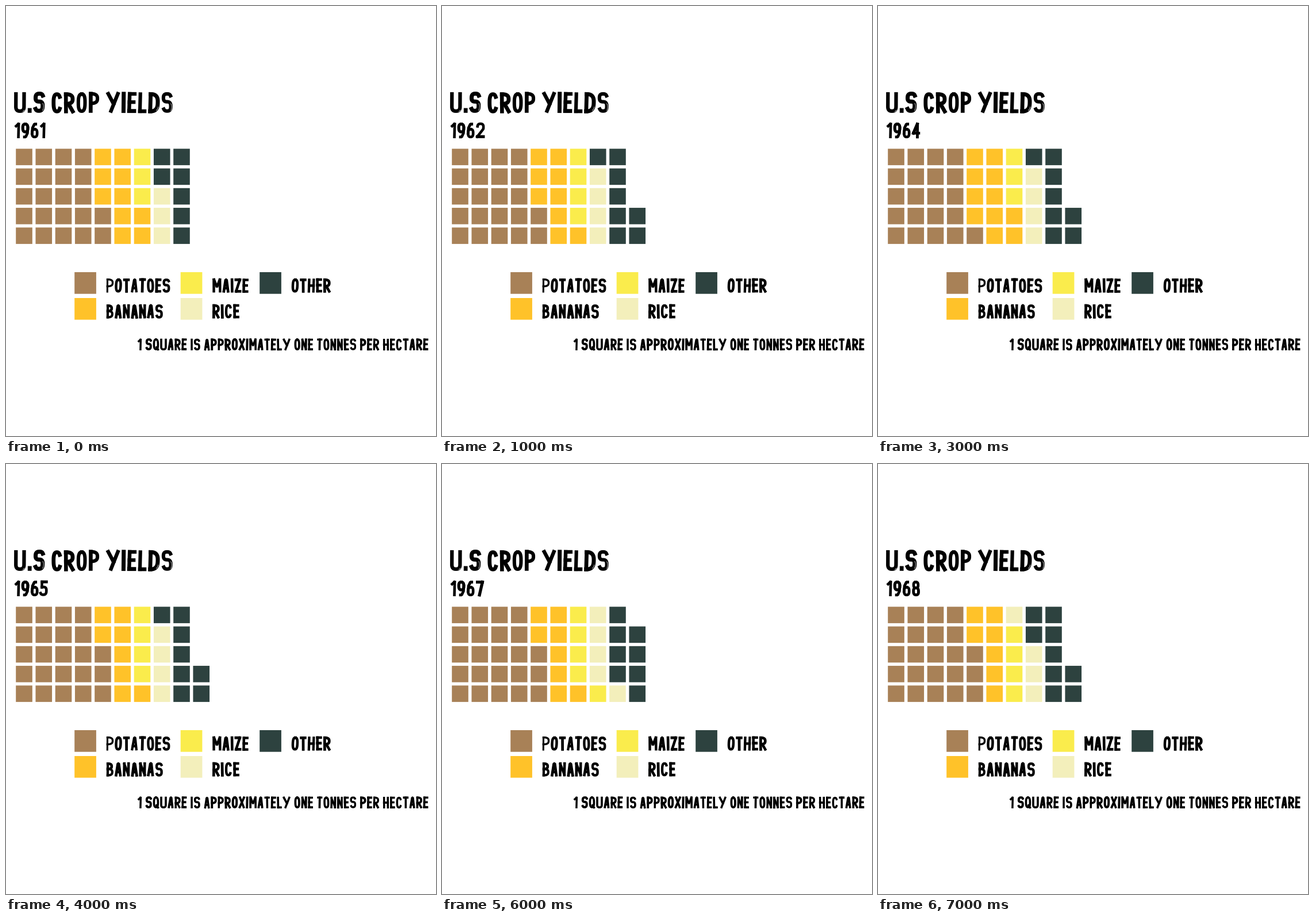
Animation of 748x748 px, one loop 8000 ms. Source, as a matplotlib script:

```python
import random

import numpy as np
import matplotlib.pyplot as plt
from matplotlib.animation import FuncAnimation
from matplotlib.patches import PathPatch, Rectangle
from matplotlib.path import Path

SIZE, DPI = 748, 100
PX = 72 / DPI
INK = "black"
CROPS = {
    "POTATOES": "#a88157",
    "BANANAS": "#ffc229",
    "MAIZE": "#faec4c",
    "RICE": "#f3efbb",
    "OTHER": "#2d423f",
}
# squares per crop, in the order above, one row per year from 1961
YIELDS = [
    (22, 10, 3, 3, 7),
    (22, 9, 4, 4, 8),
    (22, 9, 4, 4, 8),
    (21, 11, 3, 4, 8),
    (23, 8, 4, 4, 8),
    (23, 9, 4, 4, 8),
    (23, 8, 5, 5, 8),
    (23, 7, 4, 4, 9),
]
ROWS, COLS = 5, 10
CELL, STEP = 28.6, 34.25
GRID_X, GRID_Y = 17.2, 248.3


# Hand-lettered caps: strokes inside a unit box, y pointing up.
def line(*points):
    return np.array(points, float)


def arc(cx, cy, rx, ry, start, end):
    """Part of a slightly boxy ellipse, angles in degrees."""
    a = np.radians(np.linspace(start, end, 33))
    c, s = np.cos(a), np.sin(a)
    boxy = lambda v: np.sign(v) * np.abs(v) ** 0.75
    return np.column_stack((cx + rx * boxy(c), cy + ry * boxy(s)))


def join(*parts):
    return np.vstack(parts)


def bar(y, x0=0, x1=1):
    return line((x0, y), (x1, y))


def stem(x=0, y0=0, y1=1):
    return line((x, y0), (x, y1))


def lobe(cy, rx, ry):
    return arc(0, cy, rx, ry, 90, -90)


RING = arc(0.5, 0.5, 0.5, 0.5, 90, 450)
P_LOBE = lobe(0.72, 1, 0.28)

# glyph: (width relative to cap height, strokes)
GLYPHS = {
    "A": (0.48, [line((0, 0), (0.4, 1), (0.62, 1), (1, 0)), bar(0.27, 0.2, 0.8)]),
    "B": (0.5, [stem(), lobe(0.77, 0.85, 0.23), lobe(0.27, 1, 0.27)]),
    "C": (0.5, [arc(0.5, 0.5, 0.5, 0.5, 38, 322)]),
    "D": (0.53, [stem(), lobe(0.5, 1, 0.5)]),
    "E": (0.42, [stem(), bar(1), bar(0.52, 0, 0.85), bar(0)]),
    "H": (0.5, [stem(), stem(1), bar(0.5)]),
    "I": (0.19, [stem(0.5)]),
    "L": (0.4, [stem(), bar(0)]),
    "M": (0.62, [stem(), stem(1), line((0.05, 1), (0.5, 0.35), (0.95, 1))]),
    "N": (0.48, [stem(), stem(1), line((0, 0.95), (1, 0.05))]),
    "O": (0.5, [RING]),
    "P": (0.5, [stem(), P_LOBE]),
    "Q": (0.52, [RING, line((0.65, 0.2), (1, -0.03))]),
    "R": (0.5, [stem(), P_LOBE, line((0.4, 0.42), (1, 0))]),
    "S": (0.53, [join(arc(0.5, 0.77, 0.5, 0.23, 25, 270),
                      arc(0.5, 0.27, 0.5, 0.27, 90, -150))]),
    "T": (0.46, [bar(1), stem(0.5)]),
    "U": (0.57, [join(line((0, 1)), arc(0.5, 0.28, 0.5, 0.28, 180, 360),
                      line((1, 1)))]),
    "X": (0.52, [line((0, 0), (1, 1)), line((0, 1), (1, 0))]),
    "Y": (0.64, [line((1, 1), (0.3, 0)), line((0, 1), (0.55, 0.42))]),
    "Z": (0.46, [bar(1), line((1, 1), (0, 0)), bar(0)]),
    ".": (0.18, [stem(0.5, 0, 0.05)]),
    "1": (0.34, [line((0, 0.84), (0.8, 1)), stem(1)]),
    "2": (0.56, [join(arc(0.5, 0.73, 0.5, 0.27, 170, -25), line((0, 0))), bar(0)]),
    "3": (0.5, [arc(0.45, 0.77, 0.5, 0.23, 150, -90),
                arc(0.45, 0.27, 0.55, 0.27, 90, -150)]),
    "4": (0.52, [stem(0.75), line((0.7, 1), (0, 0.3)), bar(0.3)]),
    "5": (0.5, [bar(1, 0.1, 0.95), stem(0.08, 0.58, 1),
                join(line((0.08, 0.58)), arc(0.4, 0.3, 0.6, 0.3, 90, -150))]),
    "6": (0.5, [arc(0.5, 0.3, 0.5, 0.3, 90, 450),
                line((0, 0.3), (0.08, 0.7), (0.45, 1), (0.7, 1))]),
    "7": (0.5, [bar(1), line((1, 1), (0.4, 0))]),
    "8": (0.5, [arc(0.5, 0.77, 0.45, 0.23, 90, 450),
                arc(0.5, 0.27, 0.5, 0.27, 90, 450)]),
    "9": (0.5, [arc(0.5, 0.7, 0.5, 0.3, 90, 450),
                line((1, 0.7), (0.92, 0.3), (0.55, 0), (0.3, 0))]),
}
GAP, SPACE = 0.095, 0.15

fig = plt.figure(figsize=(SIZE / DPI, SIZE / DPI), dpi=DPI, facecolor="white")
ax = fig.add_axes([0, 0, 1, 1])
ax.set(xlim=(0, SIZE), ylim=(SIZE, 0))
ax.axis("off")


def stroke(points, width, color=INK):
    return ax.add_patch(PathPatch(
        Path(points), facecolor="none", edgecolor=color, lw=width * PX,
        capstyle="projecting", joinstyle="bevel", snap=False))


def write(text, x, base, height, weight=0.178, worn=False):
    """Letter the text from x on its baseline; return artists and next x."""
    artists = []
    for i, ch in enumerate(text):
        if ch == " ":
            x += (SPACE + GAP) * height
            continue
        rng = random.Random(f"{ch}{i}")
        width, strokes = GLYPHS[ch]
        t = weight * height
        w = width * height
        lean = rng.uniform(-0.02, 0.03) * height
        lift = rng.uniform(-0.015, 0.015) * height
        for s in strokes:
            px = x + t / 2 + s[:, 0] * max(w - t, 0) + lean * (s[:, 1] - 0.5)
            py = base - t / 2 - s[:, 1] * (height - t) + lift
            points = np.column_stack((px, py))
            artists.append(stroke(points, t * rng.uniform(0.93, 1.1)))
            if worn and ch in "USD" and len(s) > 30:
                n = len(s)
                scratch = points[int(n * 0.6):int(n * 0.8)] + (0.22 * t, 0.2 * t)
                artists.append(stroke(scratch, 0.7, "white"))
        x += w + GAP * height
    return artists, x


def square(x, y, size, color):
    return ax.add_patch(Rectangle((x, y), size, size, fc=color, lw=0, snap=False))


write("U.S CROP YIELDS", 14, 186, 36.2, worn=True)
_, digit_x = write("196", 15, 230, 27.2)
digits = [write(str(n + 1), digit_x, 230, 27.2)[0] for n in range(len(YIELDS))]

# legend: (swatch x, swatch y) for each crop
SPOTS = [(119.2, 463), (119.2, 508), (303.7, 463), (303.7, 508), (441.2, 463)]
for (name, color), (sx, sy) in zip(CROPS.items(), SPOTS):
    square(sx, sy, 37.7, color)
    tx, base = sx + 55.6, sy + 35.5
    if name == "POTATOES":
        _, tx = write(name[0], tx, base, 24.5, weight=0.13)
        name = name[1:]
    write(name, tx, base, 24.5)

write("1 SQUARE IS APPROXIMATELY ONE TONNES PER HECTARE", 229, 599, 20.4)

# columns fill from the bottom up, left to right
cells = [square(GRID_X + c * STEP, GRID_Y + r * STEP, CELL, "white")
         for c in range(COLS) for r in reversed(range(ROWS))]


def update(i):
    colors = [c for c, n in zip(CROPS.values(), YIELDS[i]) for _ in range(n)]
    for k, cell in enumerate(cells):
        cell.set_visible(k < len(colors))
        if k < len(colors):
            cell.set_facecolor(colors[k])
    for n, group in enumerate(digits):
        for artist in group:
            artist.set_visible(n == i)
    return cells


anim = FuncAnimation(fig, update, frames=len(YIELDS), interval=1000,
                     repeat=True, repeat_delay=0, blit=False)
plt.show()
```
